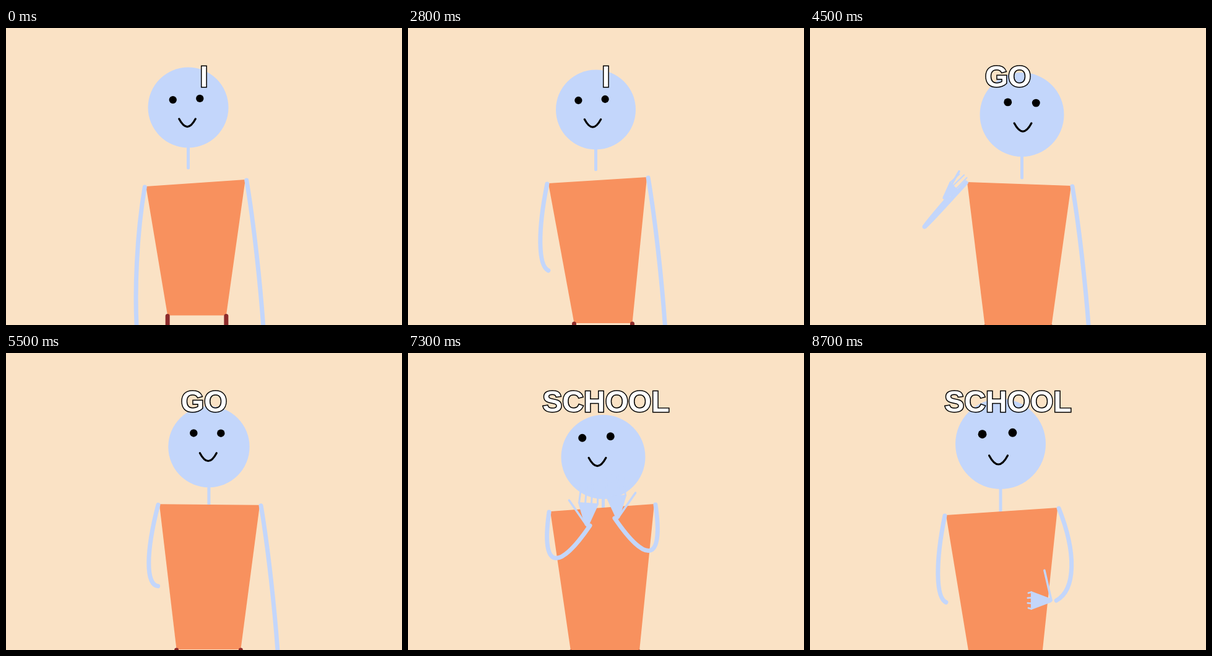
Animation, 640 px wide and 480 px high, one loop 8.8 s. Source, as an HTML page with a canvas:

```html
<!DOCTYPE html>
<html lang="en">
<head>
<meta charset="utf-8">
<title>Signing figure</title>
<style>
  html, body { margin: 0; width: 100%; height: 100%; overflow: hidden; background: #fae2c5; }
  canvas { display: block; }
</style>
</head>
<body>
<canvas id="stage" width="640" height="480"></canvas>
<script>
const ctx = document.getElementById('stage').getContext('2d');
const LOOP = 8800, STEP = 100;
const SKIN = '#c3d6fb', SHIRT = '#f8915e', LEGS = '#8c2b2b', PAPER = '#fae2c5';

// Arm poses are measured from the shoulder, with x pointing away from the body.
const noHand = { shift: 0, angle: 0, thumb: 0, size: 0, fingers: 20 };
const flatHand = { shift: 5, angle: -4, thumb: 35, size: 1, fingers: 32 };
const smallHand = { shift: 0, angle: -12, thumb: 5, size: .7, fingers: 48 };
const arms = {
  hang:  { bend: [15, 122], wrist: [12, 242], hand: noHand },
  swing: { bend: [17, 118], wrist: [28, 250], hand: noHand },
  lower: { bend: [15, 104], wrist: [-2, 140], hand: noHand },
  chest: { bend: [0, 92], wrist: [-49, 23], hand: smallHand },
  fold:  { bend: [83, 90], wrist: [29, 25], hand: { ...smallHand, shift: 7, angle: -45, thumb: -30, fingers: 32 } },
  reach: { bend: [70, 60], wrist: [104, 33], hand: { ...smallHand, angle: 80, thumb: 40 } },
  chin:  { bend: [0, 88], wrist: [-72, 4], hand: { ...flatHand, shift: 0 } },
  clasp: { bend: [0, 95], wrist: [-66, 22], hand: flatHand },
  palm:  { bend: [16, 79], wrist: [-30, 13], hand: { ...flatHand, shift: 11 } },
  tuck:  { bend: [28, 102], wrist: [-4, 149], hand: { shift: -8, angle: -90, thumb: -13, size: .9, fingers: 6 } }
};

const still = [[0, arms.swing]];
const firstStance = [
  [0, { head: [294.5, 128.5], r: 65, eyes: [-3, -13.5], chest: [306.5, 250.5], tilt: -5.5, hips: [308.5, 464.5] }],
  [1500, { head: [295.5, 145], r: 62.5, eyes: [-4.5, -16.5], chest: [307.5, 239], tilt: 0, hips: [315, 474] }],
  [2800, { head: [303.5, 132], r: 64.5, eyes: [-6.5, -16], chest: [306.5, 246], tilt: -5, hips: [315.5, 477] }]
];
const secondStance = [
  [4500, { head: [342.5, 140], r: 68, eyes: [0, -19.5], chest: [338, 252], tilt: 3, hips: [336.5, 482] }],
  [6300, { head: [317.5, 160], r: 64, eyes: [-4.5, -24], chest: [322.5, 240], tilt: -1, hips: [321, 477] }],
  [7300, { head: [315.5, 168], r: 68, eyes: [-11, -32], chest: [314, 250], tilt: -6, hips: [318.5, 482] }],
  [8700, { head: [308, 147], r: 73, eyes: [-5, -17], chest: [310, 256], tilt: -6, hips: [316, 484] }]
];

const clips = [
  {
    word: 'I', start: 0, taper: .59, body: firstStance, right: still,
    left: [[150, arms.hang], [1000, arms.chest], [1900, arms.chest], [2800, arms.lower]]
  },
  {
    word: 'GO', start: 2900, taper: .64, body: secondStance, right: still,
    left: [[2900, arms.hang], [3600, arms.fold], [4050, arms.reach], [4500, arms.fold], [5700, arms.lower]]
  },
  {
    word: 'SCHOOL', start: 5800, taper: .66, body: secondStance,
    left: [[5800, arms.hang], [6300, arms.chin], [7300, arms.clasp], [8700, arms.lower]],
    right: [[5800, arms.swing], [6300, arms.palm], [6600, arms.clasp], [6950, arms.palm],
            [7300, arms.clasp], [8700, arms.tuck]]
  }
];

// Blends numbers, or lists and objects of numbers.
function mix(a, b, k) {
  if (typeof a === 'number') return a + (b - a) * k;
  if (Array.isArray(a)) return a.map((v, i) => mix(v, b[i], k));
  return Object.fromEntries(Object.keys(a).map(key => [key, mix(a[key], b[key], k)]));
}

function sample(track, time) {
  const next = track.findIndex(([t]) => t > time);
  if (next === 0) return track[0][1];
  if (next < 0) return track[track.length - 1][1];
  const [t0, a] = track[next - 1], [t1, b] = track[next];
  const k = (time - t0) / (t1 - t0);
  return mix(a, b, k * k * (3 - 2 * k));
}

function stroke(color, width, trace) {
  ctx.strokeStyle = color;
  ctx.lineWidth = width;
  ctx.beginPath();
  trace();
  ctx.stroke();
}

function line(color, width, x0, y0, x1, y1) {
  stroke(color, width, () => { ctx.moveTo(x0, y0); ctx.lineTo(x1, y1); });
}

function disc(color, x, y, r) {
  ctx.fillStyle = color;
  ctx.beginPath();
  ctx.arc(x, y, r, 0, 2 * Math.PI);
  ctx.fill();
}

function polygon(color, points) {
  ctx.fillStyle = color;
  ctx.beginPath();
  points.forEach(([x, y]) => ctx.lineTo(x, y));
  ctx.fill();
}

function drawHead({ head: [x, y], r, eyes, tilt }) {
  const faceX = x + eyes[0], faceY = y + eyes[1];
  disc(SKIN, x, y, r);
  for (const side of [-1, 1]) {
    disc('#000', faceX + side * r * .335, faceY + side * tilt * .2, r * .095);
  }
  const mouthX = faceX + 1.5, mouthY = faceY + r * .49, w = r * .205;
  stroke('#000', 3.2, () => {
    ctx.moveTo(mouthX - w, mouthY);
    ctx.quadraticCurveTo(mouthX, mouthY + r * .39, mouthX + w, mouthY);
  });
  line(SKIN, 5, x, y + r - 2, x, y + r * 1.5);
}

function drawTorso({ r, chest, tilt, hips }, taper) {
  const half = r * 1.235;
  const corner = ([x, y], dx, dy) => [x + dx, y + dy];
  const hipCorners = [half, -half].map(dx => corner(hips, dx * taper, 0));
  polygon(SHIRT, [corner(chest, -half, -tilt), corner(chest, half, tilt), ...hipCorners]);
  for (const [x, y] of hipCorners) line(LEGS, 7, x, y + 1, x, 520);
}

function drawHand({ angle, thumb, size, fingers }) {
  const rad = Math.PI / 180;
  ctx.save();
  ctx.rotate(angle * rad);
  ctx.scale(size, size);
  polygon(SKIN, [[-3, 0], [-17, -37], [17, -37], [3, 0]]);
  for (let x = -15; x <= 15; x += 10) {
    line(SKIN, 3, x, -36, x * .9, -36 - fingers * (Math.abs(x) < 10 ? 1.1 : .9));
  }
  ctx.restore();
  ctx.rotate(thumb * rad);
  line(SKIN, 3.5, 0, 0, 0, -50);
}

function drawArm(side, { r, chest, tilt }, { bend: [bx, by], wrist: [wx, wy], hand }) {
  ctx.save();
  ctx.translate(chest[0] + side * (r * 1.235 + 2), chest[1] + side * tilt + 1);
  ctx.scale(side, 1);
  stroke(SKIN, 7, () => {
    ctx.moveTo(0, 0);
    ctx.bezierCurveTo(bx - wx * .2, by - wy * .2, bx + wx * .2, by + wy * .2, wx, wy);
  });
  if (hand.size > .3) {
    ctx.translate(wx + hand.shift, wy);
    drawHand(hand);
  }
  ctx.restore();
}

function drawWord(word) {
  ctx.font = 'bold 48px "Liberation Sans", Arial, sans-serif';
  ctx.textAlign = 'center';
  ctx.lineJoin = 'miter';
  ctx.strokeStyle = '#000';
  ctx.lineWidth = 3;
  ctx.strokeText(word, 320, 94.5);
  ctx.fillStyle = '#fff';
  ctx.fillText(word, 320, 94.5);
}

function draw(time) {
  const clip = clips.filter(c => c.start <= time).pop();
  const body = sample(clip.body, time);
  ctx.fillStyle = PAPER;
  ctx.fillRect(0, 0, 640, 480);
  ctx.lineCap = ctx.lineJoin = 'round';
  drawHead(body);
  drawTorso(body, clip.taper);
  drawArm(-1, body, sample(clip.left, time));
  drawArm(1, body, sample(clip.right, time));
  drawWord(clip.word);
}

function tick() {
  draw(Math.floor(performance.now() % LOOP / STEP) * STEP);
  requestAnimationFrame(tick);
}
tick();
</script>
</body>
</html>
```
